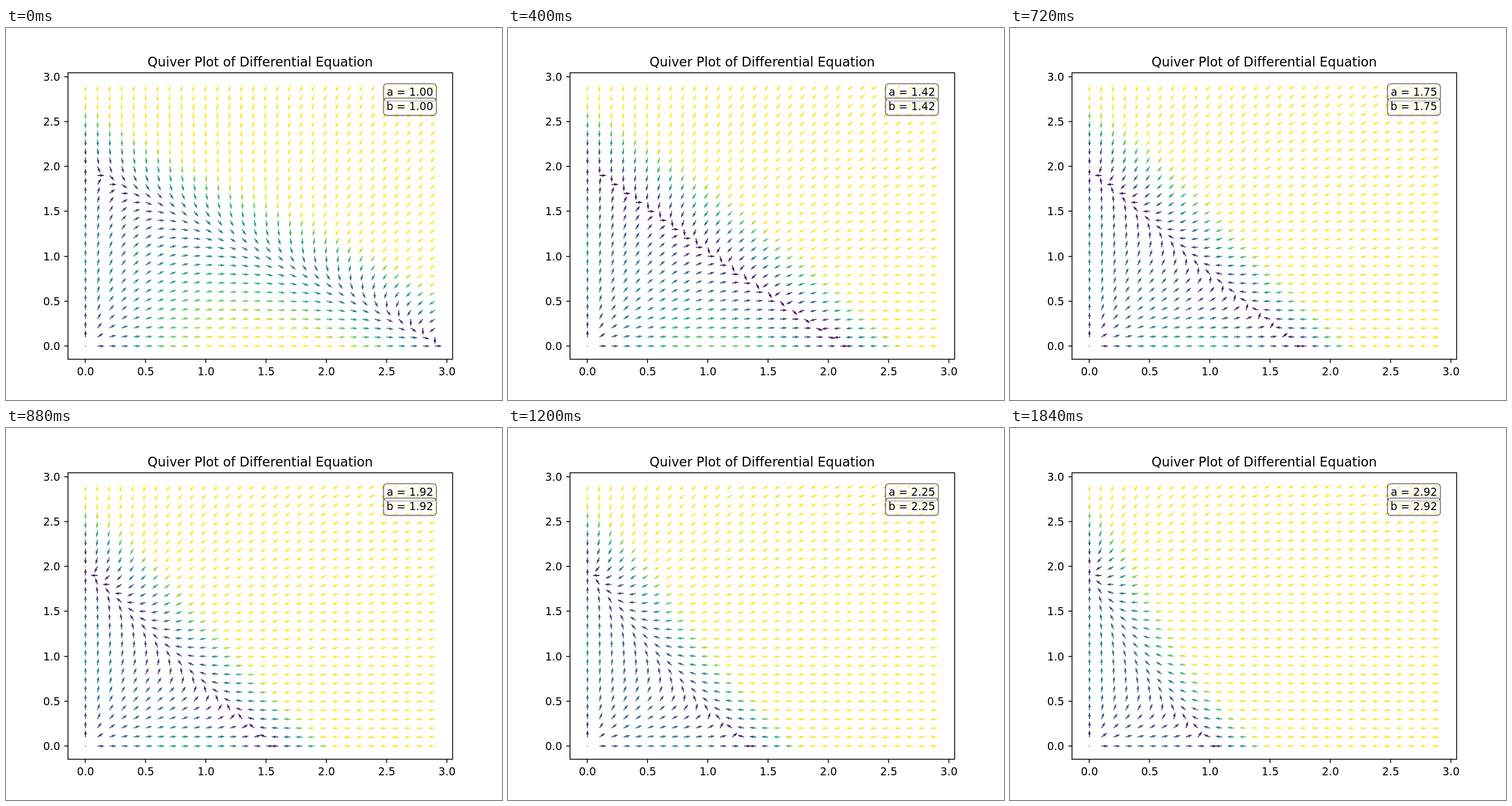
An HTML page with a canvas for the animation above (1.92 s loop, 864 by 648 pixels).

```html
<!DOCTYPE html>
<html lang="en">
<head>
<meta charset="utf-8">
<title>Quiver Plot</title>
<style>
html, body { margin: 0; width: 100%; height: 100%; overflow: hidden; background: #fff; }
canvas { display: block; }
</style>
</head>
<body>
<canvas id="stage" width="864" height="648"></canvas>
<script>
const ctx = document.getElementById('stage').getContext('2d');
const STEPS = 24, STEP_MS = 80, GRID = 30;
const LEFT = 108, TOP = 77.76, WIDTH = 669.6, HEIGHT = 498.96;
const UNIT = 0.0024 * WIDTH;        // shaft thickness
const LENGTH = WIDTH / 54;          // every arrow has the same length
const VMAX = 2;                     // speed at which the colour saturates

const VIRIDIS = ['440154', '482475', '414487', '355f8d', '2a788e', '21918c',
  '22a884', '44bf70', '7ad151', 'bddf26', 'fde725']
  .map(hex => [0, 2, 4].map(i => parseInt(hex.slice(i, i + 2), 16)));

const px = x => LEFT + WIDTH * (x + 0.145) / 3.19;
const py = y => TOP + HEIGHT * (3.045 - y) / 3.19;

function color(speed) {
  const p = Math.min(speed / VMAX, 1) * 10;
  const i = Math.min(Math.floor(p), 9);
  const mix = VIRIDIS[i].map((c, k) => Math.round(c + (VIRIDIS[i + 1][k] - c) * (p - i)));
  return `rgb(${mix})`;
}

function arrow(x, y, u, v) {
  const speed = Math.hypot(u, v);
  ctx.fillStyle = color(speed);
  ctx.beginPath();
  if (speed === 0) {
    ctx.arc(px(x), py(y), UNIT / 2, 0, 7);
  } else {
    const c = u / speed, s = -v / speed;
    const neck = LENGTH - 4.5 * UNIT, barb = LENGTH - 5 * UNIT;
    const half = UNIT / 2, wing = 1.5 * UNIT;
    [[0, half], [neck, half], [barb, wing], [LENGTH, 0],
     [barb, -wing], [neck, -half], [0, -half]]
      .forEach(([l, w]) => ctx.lineTo(px(x) + l * c - w * s, py(y) + l * s + w * c));
  }
  ctx.fill();
}

function field(a, b) {
  for (let j = 0; j < GRID; j++) {
    for (let i = 0; i < GRID; i++) {
      const x = i * 0.1, y = j * 0.1;
      arrow(x, y, x * (3 - a * x - b * y), y * (2 - x - y));
    }
  }
}

function text(str, x, y, size, align) {
  ctx.font = `${size}px "DejaVu Sans", sans-serif`;
  ctx.letterSpacing = '0.01px';     // keeps ligatures off
  ctx.textAlign = align;
  ctx.fillStyle = '#000';
  ctx.fillText(str, x, y);
}

function axes() {
  ctx.strokeStyle = '#000';
  ctx.lineWidth = 1.5;
  ctx.strokeRect(108, 78, 670, 499);
  ctx.beginPath();
  for (let t = 0; t <= 3; t += 0.5) {
    const x = Math.round(px(t)), y = Math.round(py(t));
    ctx.moveTo(x, 577);
    ctx.lineTo(x, 583.5);
    ctx.moveTo(108, y);
    ctx.lineTo(101.5, y);
    text(t.toFixed(1), px(t), 605, 18.75, 'center');
    text(t.toFixed(1), 94.5, y + 7, 18.75, 'right');
  }
  ctx.stroke();
  text('Quiver Plot of Differential Equation', LEFT + WIDTH / 2, 67, 22.5, 'center');
}

function label(name, value, y) {
  ctx.beginPath();
  ctx.roundRect(657.6, y - 20.9, 92.1, 30.2, 5.6);
  ctx.fillStyle = 'rgba(255,255,255,.5)';
  ctx.fill();
  ctx.strokeStyle = 'rgba(0,0,0,.5)';
  ctx.lineWidth = 1.875;
  ctx.stroke();
  text(`${name} = ${value.toFixed(2)}`, 744.1, y, 18.75, 'right');
}

let shown = -1;
function draw() {
  const step = Math.floor(performance.now() / STEP_MS) % STEPS;
  if (step !== shown) {
    shown = step;
    const value = 1 + 2 * step / STEPS;
    ctx.fillStyle = '#fff';
    ctx.fillRect(0, 0, 864, 648);
    field(value, value);
    axes();
    label('a', value, 118);
    label('b', value, 143);
  }
  requestAnimationFrame(draw);
}
draw();
</script>
</body>
</html>
```
